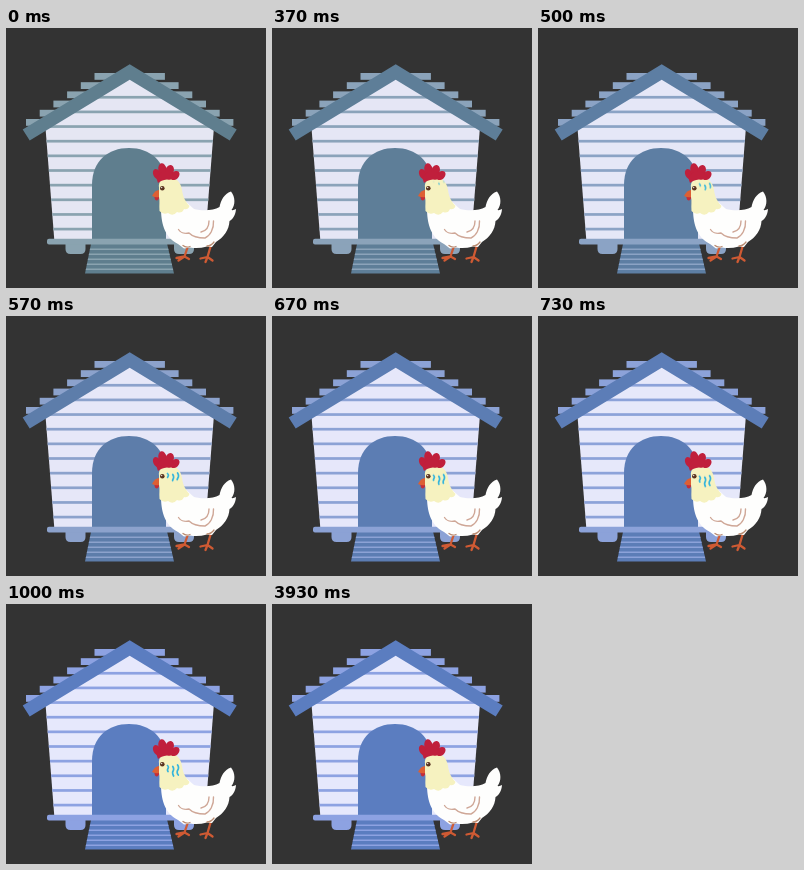
Write an HTML page that moves like this. It is 260 px wide and 260 px high and loops after 4.01 s.

```html
<!DOCTYPE html>
<html lang="en">
<head>
<meta charset="utf-8">
<title>Hen and coop</title>
<style>
  html, body { margin: 0; width: 100%; height: 100%; overflow: hidden; background: #333; }
  svg { display: block; width: 100vw; height: 100vh; }
  .dark { fill: #5f7e8e; }
  .light { fill: #8aa3b0; }
  .wall { fill: #e5e6f3; }
  .line { fill: none; stroke-linecap: round; stroke-linejoin: round; }
  .drop { stroke: #35b5dc; stroke-width: 1.7; }
</style>
</head>
<body>
<svg viewBox="0 0 260 260">
  <defs>
    <clipPath id="front"><path d="M123.700 51 L207.900 100 L199.100 212 H48.300 L39.500 100 Z"/></clipPath>
    <clipPath id="plank"><path d="M86 211 H160 L168 245.500 H79 Z"/></clipPath>
  </defs>

  <g id="tiles"></g>
  <path class="wall" d="M123.700 48 L207.900 100 L199.100 212 H48.300 L39.500 100 Z"/>
  <g id="boards" clip-path="url(#front)"></g>
  <path class="dark" d="M86 212 V157 C86 133 102 120 123 120 C144 120 160 133 160 157 V212 Z"/>
  <path class="dark" d="M123.700 36.300 L230.700 101.500 L223.700 112.500 L123.700 51.700 L23.700 112.500 L16.700 101.500 Z"/>
  <path class="light" d="M59.500 215 H79.500 V221 Q79.500 226 74.500 226 H64.500 Q59.500 226 59.500 221 Z
    M168 215 H188 V221 Q188 226 183 226 H173 Q168 226 168 221 Z"/>
  <path class="dark" d="M86 211 H160 L168 245.500 H79 Z"/>
  <g id="slats" clip-path="url(#plank)"></g>
  <rect class="light" x="41" y="210.700" width="166" height="5.800" rx="2"/>

  <g id="hen">
    <g class="line" stroke="#cf5a33" stroke-width="2.300">
      <path d="M182 218 L178.500 228.500 L170.500 230 M178.500 228.500 L183 231 M178.500 228.500 L172.500 232.500"/>
      <path d="M205 217 L201.500 229 L194.500 230.500 M201.500 229 L206.500 232.500 M201.500 229 L199.500 234"/>
    </g>
    <path fill="#fefefd" d="M155 180 C155 194 158 209 172 216 L178 220.500 L184 219.500 Q192 221 201 218.500 L206 219 L210 214
      C218 209 223 202 223.500 193 C227 191 229.500 187 230 181 Q227.500 182.500 225.500 182 C229.500 177 229.500 169 225 163.500
      C218 166 215 172 213.500 179 C207 183 196 183 188 181 L179 173 Z"/>
    <path class="line" stroke="#cfa797" stroke-width="1.400"
      d="M207.500 193 C208 201 204 208 199 210 C192 210 186 208 183 205 C178 206 174 204 172.500 201.500 M203 193 C203 199 200 203 195 204"/>
    <path class="line" stroke="#b98a70" stroke-width="1.300" d="M177 217.500 Q180 220 184 218.500 M201 218 Q205 218 208 214"/>
    <path fill="#f6f2c0" d="M153 160 C152 152 158 149 164 149.500 C172 150 175 156 176 162 C177 170 180 174 183.500 178
      Q182 182 178 181 Q176 186 171 184 Q167 189 162 185 Q157 187 153.500 183 C153 177 154 173 153 169 Z"/>
    <g fill="#c01f3c">
      <ellipse cx="150.800" cy="146" rx="3.600" ry="5.200" transform="rotate(-25 150.800 146)"/>
      <ellipse cx="156.500" cy="142" rx="4.200" ry="6.800" transform="rotate(-10 156.500 142)"/>
      <ellipse cx="163.500" cy="143" rx="4.200" ry="6.200" transform="rotate(20 163.500 143)"/>
      <ellipse cx="169" cy="147.500" rx="3.800" ry="5.200" transform="rotate(45 169 147.500)"/>
      <path d="M150 149 L156 144 L164 144 L170 149 Q167 152.500 161 151.500 Q155 152 152 155 Z"/>
    </g>
    <path fill="#c42d37" d="M149 167.500 Q153.500 167 153 170.500 Q151.500 174 149 171.500 Q147.800 169 149 167.500 Z"/>
    <path fill="#dd5f33" d="M153 162 Q149 162 146 168 Q150 170 153 169 Z"/>
    <circle cx="156.300" cy="160.300" r="2.300" fill="#59331f"/>
    <circle cx="155.700" cy="159.600" r=".7" fill="#fff"/>
  </g>

  <path class="line drop" pathLength="1" d="M161.500 161.500 Q163 163 162 164.500 T162 167.500"/>
  <path class="line drop" pathLength="1" d="M166.800 162.500 Q168.300 165 167.100 167 T167.600 172"/>
  <path class="line drop" pathLength="1" d="M171.600 161 Q173.300 163.500 171.800 166 T172.300 171"/>
</svg>
<script>
const LOOP = 4010, TURN = 1000, DRY = 3930, MID = 123.7;
const $ = id => document.getElementById(id);

function bar(parent, x, y, width, height) {
  const r = document.createElementNS('http://www.w3.org/2000/svg', 'rect');
  Object.entries({ class: 'light', x, y, width, height }).forEach(([k, v]) => r.setAttribute(k, v));
  parent.append(r);
}

for (let i = 0; i < 6; i++) {
  const x = 88.5 - 13.7 * i;
  bar($('tiles'), x, 45 + 9.2 * i, 2 * (MID - x), 6.8);
}
for (let i = 0; i < 10; i++) bar($('boards'), 38, 67.9 + 14.65 * i, 174, 2.7);
for (let i = 0; i < 5; i++) bar($('slats'), 78, 220.5 + 5 * i, 92, 1.5);

const anims = [];
const play = (el, frames) => anims.push(el.animate(
  frames.map(([ms, style]) => ({ offset: ms / LOOP, ...style })),
  { duration: LOOP, iterations: Infinity }
));

const tints = {
  dark: ['#5f7e8e', '#5b7dc0'],
  light: ['#8aa3b0', '#8da2e2'],
  wall: ['#e5e6f3', '#e6e8fc']
};
for (const [cls, [from, to]] of Object.entries(tints))
  document.querySelectorAll('.' + cls).forEach(el => play(el, [
    [0, { fill: from }],
    [80, { fill: from, easing: 'ease-in-out' }],
    [TURN, { fill: to }],
    [LOOP, { fill: to }]
  ]));

// Sweat grows while it slides down, then vanishes at once.
const sweat = (y, len, opacity) => ({
  transform: `translateY(${y}px)`, strokeDasharray: `${len} 2`, opacity
});
document.querySelectorAll('.drop').forEach((el, i) => {
  const start = [400, 350, 380][i];
  play(el, [
    [0, sweat(-8, 0.05, 0)],
    [start - 40, sweat(-8, 0.05, 0)],
    [start + 40, sweat(-7, 0.1, 0.7)],
    [570, sweat(-4, 0.65, 1)],
    [730, sweat(-1.2, 0.95, 1)],
    [TURN, sweat(0, 1, 1)],
    [DRY, sweat(0, 1, 1)],
    [DRY, sweat(0, 1, 0)],
    [LOOP, sweat(0, 1, 0)]
  ]);
});

anims.forEach(a => { a.startTime = document.timeline.currentTime; });
</script>
</body>
</html>
```
